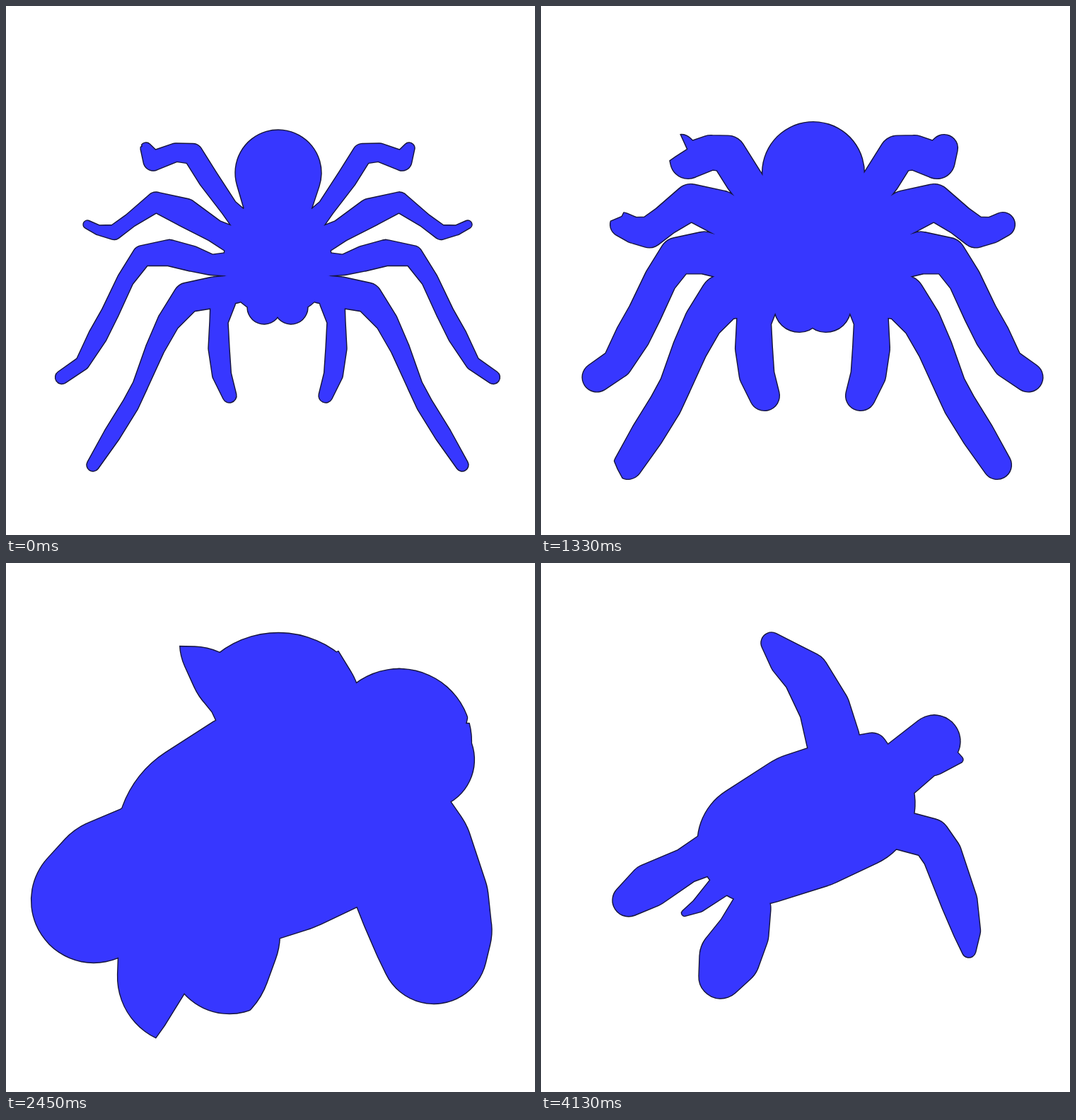
Recreate the animation shown at these times as an HTML page with a canvas. Size 748x748 px, loop 4.83 s.

```html
<!DOCTYPE html>
<html lang="en">
<head>
<meta charset="utf-8">
<title>Shape morph</title>
<style>
  html, body { margin: 0; width: 100%; height: 100%; overflow: hidden; background: #fff; }
  canvas { display: block; }
</style>
</head>
<body>
<canvas id="stage" width="748" height="748"></canvas>
<script>
const SIZE = 748, HOLD = 700, STEP = 70, STEPS = 50, LOOP = 4830;
const REACH = 142;   // largest gap between the two shapes
const LINE = 0.7;    // half the outline width
const FILL = '#3737ff', EDGE = '#14143a';
const AXIS = 384;    // the spider's line of symmetry

// A limb is a chain of joints [x, y, radius]; a shape is a list of limbs.
const body = [[385, 236, 61], [384, 290, 45], [384, 362, 77]];
const leg1 = [[198, 201, 8], [208, 219, 14], [240, 207, 13], [264, 209, 14.5], [286, 244, 14.5],
  [315, 285, 12.5], [345, 318, 18]];
const leg2 = [[115, 309, 6], [131, 317, 7], [153, 320, 10.5], [176, 303, 10], [212, 277, 14],
  [253, 292, 20], [295, 318, 16], [330, 336, 20]];
const leg3 = [[79, 525, 9.5], [108, 505, 10], [130, 466, 13.5], [147, 434, 12.5], [169, 387, 12],
  [193, 353, 14.5], [231, 349, 18.5], [262, 357, 18], [290, 366, 14.5], [325, 365, 18]];
const leg4 = [[123, 649, 9], [150, 606, 12], [176, 564, 12], [190, 536, 11], [211, 484, 13.5],
  [230, 446, 16], [257, 412, 21], [294, 405, 22], [325, 400, 20]];
const feeler = [[316, 551, 10], [305, 521, 13.5], [301, 484, 15], [301, 446, 13], [307, 417, 18]];
const tailBump = [[365, 426, 24], [375, 400, 24]];

const mirror = limb => limb.map(([x, y, r]) => [2 * AXIS - x, y, r]);
const half = [leg1, leg2, leg3, leg4, feeler, tailBump];
const spider = [body, ...half, ...half.map(mirror)];

const shell = [[308, 396, 87], [376, 364, 97], [436, 340, 93], [468, 262, 22]];
const head = [[500, 298, 39], [556, 252, 37], [552, 271, 30], [592, 278, 5]];
const leftFlipper = [[326, 113, 15], [349, 137, 26], [375, 158, 33], [401, 206, 36], [413, 250, 38]];
const rightFlipper = [[510, 378, 28], [551, 389, 28], [567, 412, 28], [591, 478, 26], [602, 520, 19.5], [605, 548, 10]];
const leftFoot = [[124, 477, 23], [154, 456, 31], [205, 428, 25], [240, 410, 30]];
const rightFoot = [[254, 585, 31], [267, 557, 43], [285, 525, 37], [297, 488, 28]];
const tail = [[203, 495, 4.5], [223, 484, 10], [255, 455, 17]];
const turtle = [shell, head, leftFlipper, rightFlipper, leftFoot, rightFoot, tail];

// Outline around two circles and the tangents between them.
function addLink(path, [x1, y1, r1], [x2, y2, r2]) {
  const dx = x2 - x1, dy = y2 - y1, turn = Math.atan2(dy, dx);
  const ratio = (r1 - r2) / Math.hypot(dx, dy);
  const open = Math.acos(Math.max(-1, Math.min(1, ratio)));
  const link = new Path2D();
  link.arc(x1, y1, r1, turn + open, turn - open + 2 * Math.PI);
  link.arc(x2, y2, r2, turn - open, turn + open);
  link.closePath();
  path.addPath(link);
}

// Widening every joint grows the whole shape evenly.
function grow(shape, extra) {
  const path = new Path2D();
  for (const limb of shape) {
    const joints = limb.map(([x, y, r]) => [x, y, r + extra]);
    for (let i = 1; i < joints.length; i++) addLink(path, joints[i - 1], joints[i]);
  }
  return path;
}

function makeLayer() {
  const c = document.createElement('canvas');
  c.width = c.height = SIZE;
  return c.getContext('2d');
}

const ctx = document.getElementById('stage').getContext('2d');
const layers = [makeLayer(), makeLayer()];

// Paint the overlap of both grown shapes.
function paintOverlap(extras, color) {
  [spider, turtle].forEach((shape, i) => {
    const layer = layers[i];
    layer.globalCompositeOperation = 'source-over';
    layer.clearRect(0, 0, SIZE, SIZE);
    layer.fillStyle = color;
    layer.fill(grow(shape, extras[i]));
  });
  layers[0].globalCompositeOperation = 'destination-in';
  layers[0].drawImage(layers[1].canvas, 0, 0);
  ctx.drawImage(layers[0].canvas, 0, 0);
}

const ease = t => t < 0.5 ? 2 * t * t : 1 - 2 * (1 - t) ** 2;

function draw(step) {
  const r = REACH * ease(step / STEPS), s = REACH - r;
  ctx.fillStyle = '#fff';
  ctx.fillRect(0, 0, SIZE, SIZE);
  paintOverlap([r + LINE, s + LINE], EDGE);
  paintOverlap([r - LINE, s - LINE], FILL);
}

const start = performance.now();
let shown = -1;

function tick() {
  const t = (performance.now() - start) % LOOP;
  const step = t < HOLD ? 0 : Math.min(STEPS, Math.floor((t - HOLD) / STEP) + 1);
  if (step !== shown) draw(shown = step);
  requestAnimationFrame(tick);
}
tick();
</script>
</body>
</html>
```
